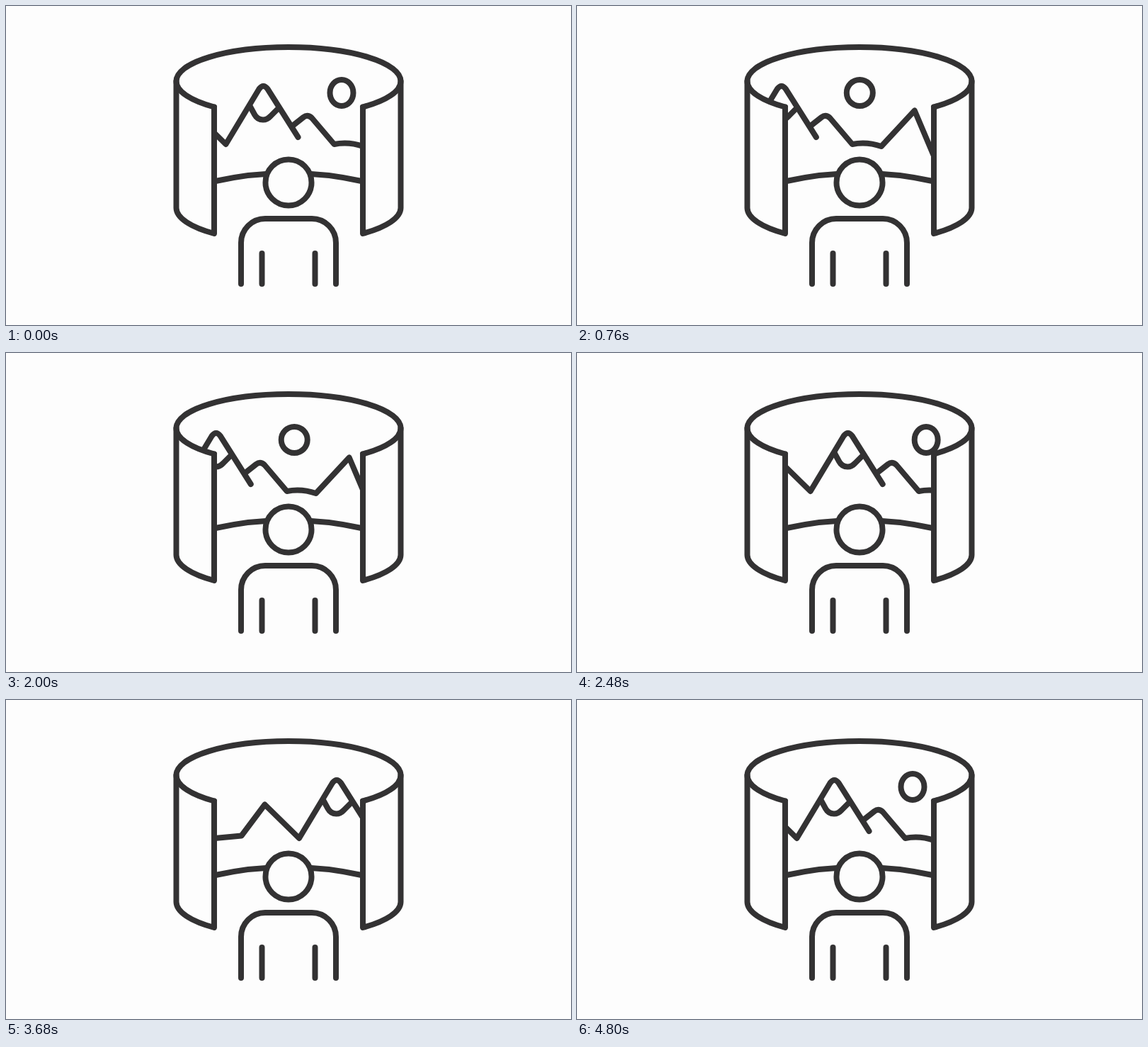
An HTML page that plays this animation: 798 px wide and 450 px high, repeating every 4.84 s.

```html
<!DOCTYPE html>
<html lang="en">
<head>
<meta charset="utf-8">
<title>Panorama viewer</title>
<style>
  html, body { margin: 0; width: 100%; height: 100%; overflow: hidden; background: #fdfdfd; }
  svg { display: block; width: 100vw; height: 100vh; fill: none; stroke: #333233; stroke-width: 8; stroke-linecap: round; stroke-linejoin: round; }
</style>
</head>
<body>
<svg viewBox="0 0 798 450">
  <clipPath id="screen">
    <path d="M240.500 106A158.500 48.500 0 0 1 557.500 106A158.500 48.500 0 0 1 504 142.500V320H294V142.500A158.500 48.500 0 0 1 240.500 106Z"/>
  </clipPath>

  <g clip-path="url(#screen)">
    <g id="scenery">
      <path d="M130 199L181 196L229 191.500L262 147.500L310.500 195L357.500 117Q363.500 109 369.500 117L412.500 185"/>
      <path d="M345 142L351 153Q355 160.500 363 160.500Q369 160.500 374 155L384 145"/>
      <path d="M406 168L420 157Q426 152.500 432 158L463.500 195Q484 191 504.500 198L551.500 147.500L578 210L625 206"/>
      <ellipse id="sun" cx="474" cy="122.500" rx="16.500" ry="18.500"/>
    </g>
    <path d="M296 247Q399 224.600 502 247"/>
  </g>

  <!-- Curved screen -->
  <path d="M294 142.500A158.500 48.500 0 0 1 240.500 106A158.500 48 0 0 1 557.500 106A158.500 48.500 0 0 1 504 142.500"/>
  <path d="M240.500 106V285A158.500 48.500 0 0 0 294 321V142.500M557.500 106V285A158.500 48.500 0 0 1 504 321V142.500"/>

  <!-- Viewer -->
  <circle cx="399" cy="249" r="32.500" fill="#fdfdfd"/>
  <path d="M332 392V334A34 34 0 0 1 366 300H432A34 34 0 0 1 466 334V392M361.500 349V392M436.500 349V392"/>
</svg>
<script>
  const LOOP = 4840;
  // Each move: start and end time, start and end offset
  const moves = [
    [0, 1180, 0, -105],
    [1540, 3300, -105, 120],
    [3360, 4740, 120, 0]
  ];
  const scenery = document.getElementById('scenery');
  const sun = document.getElementById('sun');
  const clamp = v => Math.min(1, Math.max(0, v));
  const ease = u => u * u * (3 - 2 * u);

  function offsetAt(t) {
    return moves.reduce((x, [start, end, from, to]) =>
      x + (to - from) * ease(clamp((t - start) / (end - start))), 0);
  }

  function draw(now) {
    const x = offsetAt(now % LOOP);
    scenery.setAttribute('transform', `translate(${x} 0)`);
    sun.setAttribute('rx', 16.5 + 2 * clamp(-x / 60));
    requestAnimationFrame(draw);
  }
  requestAnimationFrame(draw);
</script>
</body>
</html>
```
